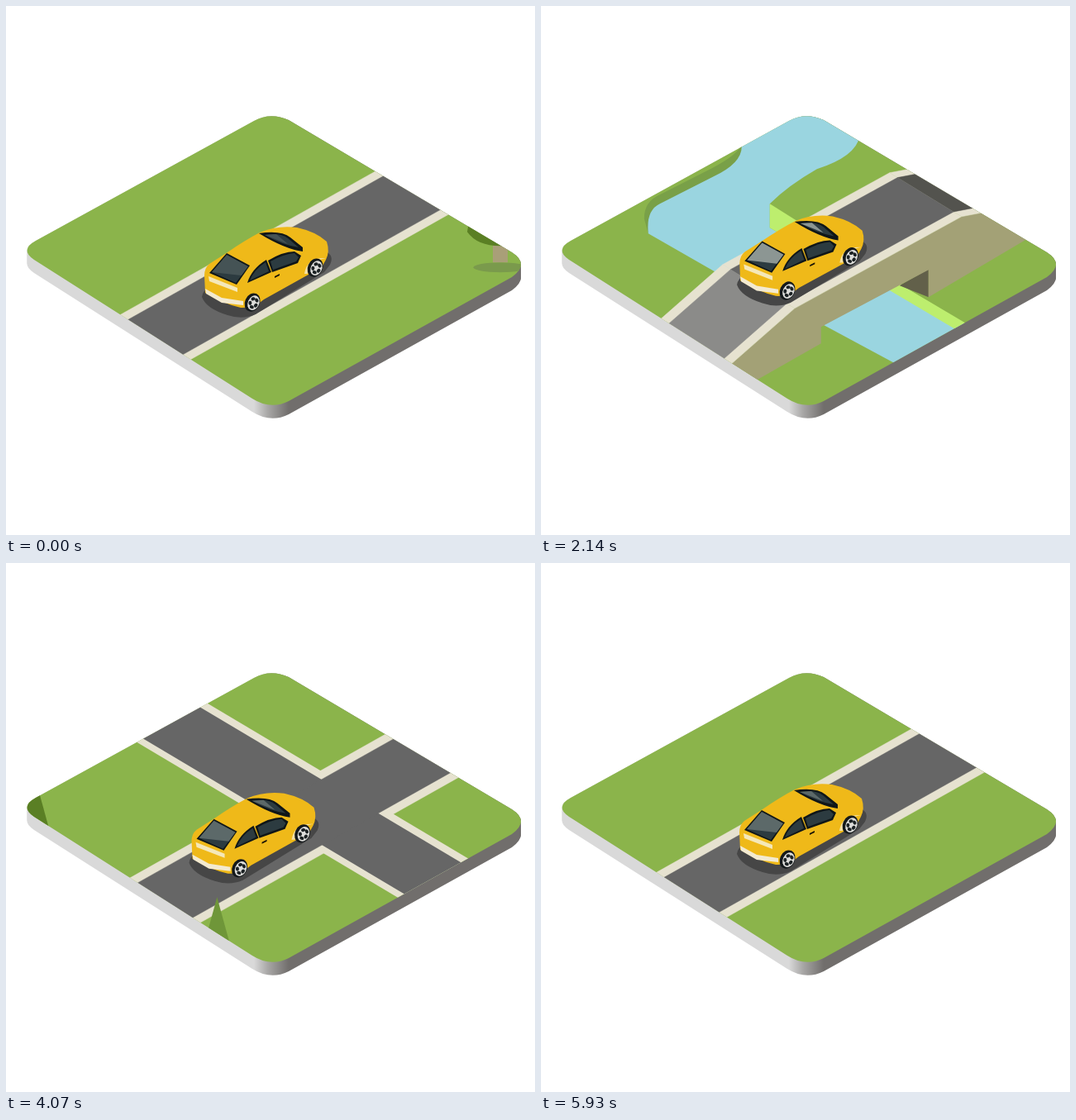
Write an HTML page with a canvas that moves like this. It is 640 by 640 pixels and loops after 6000 ms.

```html
<!DOCTYPE html>
<html>
<head>
<meta charset="utf-8">
<style>
html, body { margin: 0; width: 100%; height: 100%; overflow: hidden; background: #fff; }
canvas { display: block; width: 640px; height: 640px; }
</style>
</head>
<body>
<canvas id="c" width="640" height="640"></canvas>
<script>
const g = document.getElementById('c').getContext('2d');
const LOOP = 6000, FRAMES = 84, STEP = LOOP / FRAMES;
const FLAT = 0.5625, BRIDGE_TIME = 2640, CROSS_TIME = 4710;
const GRASS = '#8bb44b', WATER = '#9ad5e0', BANK = '#bdee6e', TAN = '#a3a176', CURB = '#e6e2d0';
const ROAD = '#666666', RAMP_UP = '#8b8b89', RAMP_DOWN = '#53534e';
const DARK_TREE = '#5a7f24', LIGHT_TREE = '#6f9639', GLASS = '#2c3b40', FRAME = '#0f1618';

// Ground lift and car position at a few moments, linear between them
const keys = [
  { t: 0, lift: 0, x: 337, y: 338 },
  { t: 1000, lift: 18, x: 342, y: 328.5 },
  { t: 1640, lift: 46, x: 347, y: 319.5 },
  { t: 2640, lift: 48, x: 327.5, y: 329 },
  { t: 3430, lift: 11, x: 306, y: 350.5 },
  { t: 4710, lift: -2, x: 337, y: 347 },
  { t: 5210, lift: -8, x: 337, y: 338 },
  { t: LOOP, lift: -8, x: 337, y: 338 }
];

function pose(t) {
  const i = Math.max(1, keys.findIndex(k => k.t >= t));
  const a = keys[i - 1], b = keys[i], k = (t - a.t) / (b.t - a.t);
  const mix = name => a[name] + (b[name] - a[name]) * k;
  return { lift: mix('lift'), x: mix('x'), y: mix('y') };
}

// The ground gathers speed slightly over the loop
const scroll = t => 213 * (t / 1000) ** 1.0625;

// Lower road edge: flat, ramp up, bridge, ramp down, flat
const sections = [
  { run: 900, slope: FLAT, color: ROAD },
  { run: 196, slope: 0.878, color: RAMP_UP },
  { run: 202, slope: 0.55, color: ROAD },
  { run: 185, slope: 0.19, color: RAMP_DOWN },
  { run: 1700, slope: FLAT, color: ROAD }
];
const ACROSS = { x: -87, y: -53 };
const edge = [{ x: -908, y: 1112 }];
for (const s of sections) {
  const p = edge[edge.length - 1];
  edge.push({ x: p.x + s.run, y: p.y - s.run * s.slope });
}

function roadY(x) {
  const i = sections.findIndex((s, n) => x < edge[n + 1].x);
  return edge[i].y - (x - edge[i].x) * sections[i].slope;
}

// Tilt from the road heights under both axles
function pitch(t) {
  const x = 319 + scroll(t) - scroll(BRIDGE_TIME) - ACROSS.x / 2;
  const rise = (roadY(x - 38) - roadY(x + 38)) / 76;
  return Math.atan(FLAT) - Math.atan(rise);
}

function path(color, d) {
  g.fillStyle = color;
  g.fill(new Path2D(d));
}

function poly(color, points) {
  g.fillStyle = color;
  g.beginPath();
  points.forEach(p => g.lineTo(p.x, p.y));
  g.fill();
}

function oval(color, x, y, rx, ry, turn = 0) {
  g.fillStyle = color;
  g.beginPath();
  g.ellipse(x, y, rx, ry, turn, 0, 7);
  g.fill();
}

// Draws scenery whose coordinates are those it has on stage at time ref
function layer(t, ref, draw) {
  const s = scroll(t) - scroll(ref);
  g.save();
  g.translate(-s, FLAT * s + pose(t).lift - pose(ref).lift);
  draw();
  g.restore();
}

const plate = new Path2D('M36 284 L300 139 Q320 128 342 138 L612 298 Q634 312 612 328 L342 478 Q320 489 298 475 L34 307 Q16 295 36 284 Z');

function drawSides() {
  const k = g.createLinearGradient(300, 0, 342, 0);
  k.addColorStop(0, '#d9d9d9');
  k.addColorStop(0.4, '#a8a7a6');
  k.addColorStop(1, '#716e6c');
  g.fillStyle = k;
  for (let y = 0; y <= 16; y++) {
    g.save();
    g.translate(0, y);
    g.fill(plate);
    g.restore();
  }
}

function drawRiver() {
  path('#79a048', 'M11 343 L6 325 Q6 304 25 296 L88 264 Q122 246 124 234 V260 L25 315 Z');
  path(WATER, 'M93 390 L11 343 Q8 315 25 307 L90 274 Q124 258 124 238 Q120 190 60 150 H150 L217 184 ' +
    'Q268 208 267 225 Q262 250 215 265 Q180 285 158 307 V336 L250 390 Z');
  path(BANK, 'M158 307 L220 346 L200 361 L158 336 Z');
  path(WATER, 'M220 452 L311 402 L540 540 L480 592 Z');
  path(BANK, 'M300 410 L313 403 L553 545 L540 552 Z');
}

function treeFoot(x, y) {
  oval('#7a9a4c', x, y + 27, 32.5, 6);
  g.fillStyle = '#a99f78';
  g.fillRect(x - 9, y, 18, 21);
}

// Cone with its top given height above the trunk; round swells the sides
function tree(x, y, color, height, round) {
  const tip = y - height, hip = y - 16, cx = round ? 24 : 20, cy = round ? tip - 4 : (tip + hip) / 2;
  treeFoot(x, y);
  path(color, `M${x - 40} ${hip} Q${x - cx} ${cy} ${x} ${tip} Q${x + cx} ${cy} ${x + 40} ${hip} Q${x + 28} ${y + 1} ${x} ${y + 1} Q${x - 28} ${y + 1} ${x - 40} ${hip} Z`);
}

function drawWall() {
  path('#62604a', 'M315 406 L350 386 V420 Z');
  poly(TAN, [...edge.slice(1, 5), { x: 350, y: 420 }, { x: 350, y: 387 }, { x: 220, y: 456 }, { x: 220, y: 476 }]);
}

function drawRoad(inset, color) {
  const side = (p, k) => ({ x: p.x + ACROSS.x * k, y: p.y + ACROSS.y * k });
  sections.forEach((s, i) => {
    const a = edge[i], b = edge[i + 1];
    g.strokeStyle = color || s.color;
    g.lineWidth = 0.5;
    poly(g.strokeStyle, [side(a, inset), side(b, inset), side(b, 1 - inset), side(a, 1 - inset)]);
    g.stroke();
  });
}

// Crossing street, given by vertical distance from its upper edge
function band(color, top, bottom) {
  const y = x => 360 + 0.595 * (x - 266);
  const l = -400, r = 1000;
  poly(color, [{ x: l, y: y(l) + top }, { x: r, y: y(r) + top }, { x: r, y: y(r) + bottom }, { x: l, y: y(l) + bottom }]);
}

function drawWheel(x, y) {
  g.save();
  g.translate(x, y);
  g.rotate(0.42);
  oval('#14191b', -1, 0, 9, 11.5);
  oval('#dededb', 0.5, 0, 6.8, 9.2);
  for (let i = 0; i < 5; i++) {
    const a = i * Math.PI * 0.4 + 0.3;
    oval('#1c2224', 0.5 + 3.9 * Math.cos(a), 5.4 * Math.sin(a), 2, 2.6, a);
  }
  g.restore();
}

function drawCar(t) {
  const { x, y } = pose(t);
  const shine = `rgba(170,178,172,${0.2 + 0.6 * Math.sin(Math.PI * t / 5000) ** 2})`;
  g.save();
  g.translate(x, y);
  g.rotate(pitch(t));
  g.translate(-337, -338);

  path('#464646', 'M237 352 Q238 344 246 340 L388 298 Q397 302 392 313 L385 322 L302 373 Q286 380 268 374 Q242 366 237 352 Z');
  path('#efb919', 'M241 347 L240 326 Q240 317 246 312 L268 298 Q288 284 307 274 Q328 265 352 268 Q375 273 388 285 Q392 297 387 307 L382 316 L312 355 Q300 366 284 365 Q262 360 241 347 Z');

  // Rear: window, lights, bumper
  path(FRAME, 'M267 299 L295 314 L279 337 L246 323 Z');
  path(GLASS, 'M267 301 L293 315 L278 335 L249 322 Z');
  path(shine, 'M267 301 L293 315 L285 326 L249 322 Z');
  path('#f5e8b8', 'M245 327 L280 341 V346 L246 333 Z');
  path('#f3ead0', 'M241 342 L261 353 L287 357 V362 L261 359 L242 348 Z');

  // Windshield and side windows
  path(FRAME, 'M306 275 Q333 271 344 280 L359 292 V297 Q337 294 306 275 Z');
  path(GLASS, 'M313 277 Q332 274 341 281 L354 292 Q334 289 313 277 Z');
  path(shine, 'M313 277 L327 276 L341 288 Z');
  path(FRAME, 'M292 335 Q297 318 315 307 L321 322 Z');
  path(GLASS, 'M295 332 Q300 319 314 310 L318 321 Z');
  path(FRAME, 'M317 308 Q335 297 349 297 L357 302 L353 311 L322 322 Z');
  path(GLASS, 'M320 309 Q336 300 349 299 L354 304 L351 309 L323 319 Z');
  path('#191405', 'M325 327 L331 324 V326 L325 329 Z');
  path('#f5e2a6', 'M361 324 Q364 304 387 305 Q368 308 365 324 Z');
  drawWheel(299, 359);
  drawWheel(375, 317);
  g.restore();
}

function render(t) {
  g.fillStyle = '#fff';
  g.fillRect(0, 0, 640, 640);
  drawSides();
  g.save();
  g.clip(plate);
  g.fillStyle = GRASS;
  g.fillRect(0, 0, 640, 640);
  layer(t, BRIDGE_TIME, () => {
    drawRiver();
    tree(321, 204, LIGHT_TREE, 162);
    tree(370, 216, DARK_TREE, 162);
    drawWall();
  });
  layer(t, CROSS_TIME, () => band(CURB, 0, 98));
  layer(t, BRIDGE_TIME, () => drawRoad(0, CURB));
  layer(t, CROSS_TIME, () => band(ROAD, 10, 89));
  layer(t, BRIDGE_TIME, () => drawRoad(0.11));
  drawCar(t);
  layer(t, 1000, () => tree(385, 427, DARK_TREE, 112, true));
  layer(t, 3430, () => tree(413, 484, LIGHT_TREE, 162));
  g.restore();
}

const start = performance.now();
function tick() {
  const t = (performance.now() - start) % LOOP;
  render(Math.floor((t + 4) / STEP) % FRAMES * STEP);
  requestAnimationFrame(tick);
}
tick();
</script>
</body>
</html>
```
